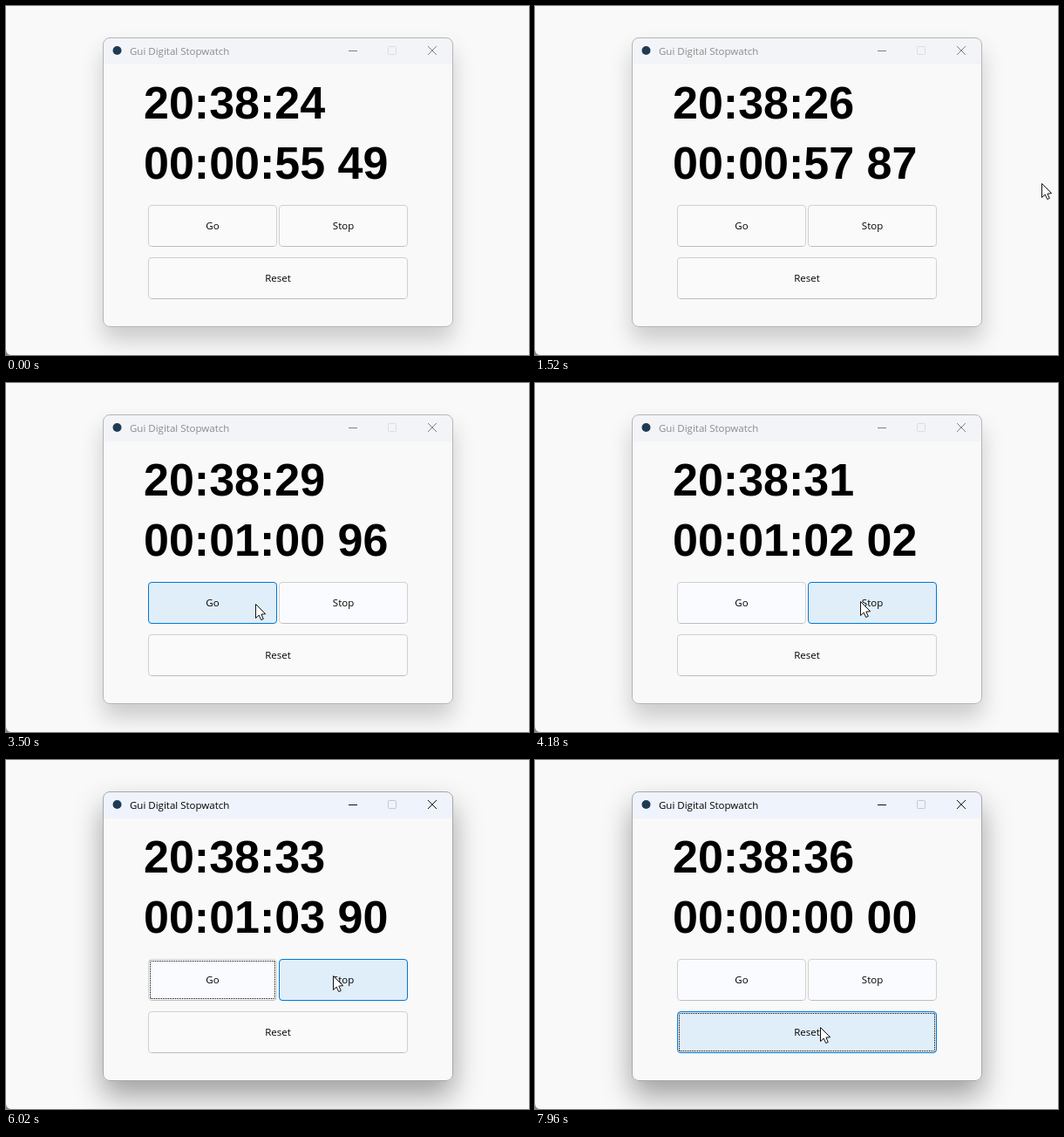
An HTML page with a canvas that plays this animation: 600 px wide and 400 px high, repeating every 8 s.

```html
<!DOCTYPE html>
<html lang="en">
<head>
<meta charset="utf-8">
<title>Gui Digital Stopwatch</title>
<style>
  html, body { margin: 0; width: 100%; height: 100%; overflow: hidden; background: #f9f9f9; }
  canvas { display: block; }
</style>
</head>
<body>
<canvas id="stage" width="600" height="400"></canvas>
<script>
const ctx = document.getElementById('stage').getContext('2d');
const LOOP = 8000, STEP = 20;
const SPEED = 1.5625;
const UI_FONT = '11.5px "Open Sans", "Noto Sans", sans-serif';
const DIGIT_FONT = 'bold 52px "Liberation Sans", Arial, sans-serif';

const buttons = {
  go: { label: 'Go', x: 163, y: 228, w: 148, h: 48, seen: 3340 },
  stop: { label: 'Stop', x: 313, y: 228, w: 148, h: 48, seen: 3100 },
  reset: { label: 'Reset', x: 163, y: 288, w: 298, h: 48, seen: LOOP }
};

const clicks = [
  { id: 'stop', down: 4460, up: 4540 },
  { id: 'go', down: 5080, up: 5180 },
  { id: 'stop', down: 6860, up: 6940 },
  { id: 'reset', down: 7880, up: 7960 }
];
const ACTIVE_FROM = clicks[0].down;

// time, x, y
const pointerPath = [
  [480, 601, 66], [820, 584, 193], [1100, 581, 203],
  [2700, 581, 203], [3480, 286, 253],
  [3900, 286, 253], [4260, 385, 250],
  [4640, 385, 250], [4880, 263, 248],
  [5240, 263, 248], [5640, 375, 247],
  [7500, 375, 247], [7740, 327, 306]
];

const pad = n => String(n).padStart(2, '0');

function pointerAt(t) {
  if (t <= pointerPath[0][0]) return null;
  const i = pointerPath.findIndex(p => p[0] >= t);
  if (i < 0) return pointerPath[pointerPath.length - 1].slice(1);
  const [t0, x0, y0] = pointerPath[i - 1], [t1, x1, y1] = pointerPath[i];
  const u = (t - t0) / (t1 - t0), s = u * u * (3 - 2 * u);
  return [Math.round(x0 + (x1 - x0) * s), Math.round(y0 + (y1 - y0) * s)];
}

function clockText(t) {
  return '20:38:' + (24 + Math.floor(0.5 + t * SPEED / 1000));
}

function counterText(t) {
  const [stop1, go, stop2, reset] = clicks.map(c => c.up);
  let cs = 0;
  if (t < reset) {
    const ran = Math.min(t, stop1) + Math.max(0, Math.min(t, stop2) - go);
    cs = Math.floor(5549.65 + ran * SPEED / 10);
  }
  const s = Math.floor(cs / 100);
  return `00:${pad(Math.floor(s / 60))}:${pad(s % 60)} ${pad(cs % 100)}`;
}

function text(str, x, y, font, color, align = 'left') {
  ctx.font = font;
  ctx.fillStyle = color;
  ctx.textAlign = align;
  ctx.fillText(str, x, y);
}

function line(color, ...pts) {
  ctx.strokeStyle = color;
  ctx.lineWidth = 1;
  ctx.beginPath();
  for (let i = 0; i < pts.length; i += 4) {
    ctx.moveTo(pts[i], pts[i + 1]);
    ctx.lineTo(pts[i + 2], pts[i + 3]);
  }
  ctx.stroke();
}

function roundRect(x, y, w, h, r) {
  ctx.beginPath();
  ctx.roundRect(x, y, w, h, r);
}

function drawBackdrop() {
  ctx.fillStyle = '#f9f9f9';
  ctx.fillRect(0, 0, 600, 400);
  ctx.fillStyle = '#8a8a8a';
  ctx.beginPath();
  ctx.moveTo(0, 394);
  ctx.quadraticCurveTo(0.5, 399, 5, 400);
  ctx.lineTo(0, 400);
  ctx.fill();
}

function drawWindow(active) {
  ctx.save();
  ctx.shadowColor = active ? 'rgba(0,0,0,.36)' : 'rgba(0,0,0,.19)';
  ctx.shadowBlur = active ? 33 : 26;
  ctx.shadowOffsetY = active ? 17 : 15;
  ctx.fillStyle = '#f9f9f9';
  roundRect(111, 36, 402, 332, 8);
  ctx.fill();
  ctx.restore();

  ctx.fillStyle = active ? '#eff3fb' : '#f3f4f7';
  roundRect(112, 37, 400, 30, [7, 7, 0, 0]);
  ctx.fill();
  ctx.strokeStyle = active ? '#a6a8aa' : '#b4b5b6';
  ctx.lineWidth = 1;
  roundRect(111.5, 36.5, 401, 331, 7.5);
  ctx.stroke();

  ctx.fillStyle = '#1f3b54';
  ctx.beginPath();
  ctx.arc(127.5, 51, 5, 0, Math.PI * 2);
  ctx.fill();

  text('Gui Digital Stopwatch', 142, 56, UI_FONT, active ? '#000' : '#8b8b8b');
  const ink = active ? '#111' : '#808080';
  line(ink, 393, 51.5, 403, 51.5);
  line(ink, 484, 46, 494, 56, 494, 46, 484, 56);
  ctx.strokeStyle = active ? '#c3c7ce' : '#dcdde0';
  roundRect(438.5, 46.5, 9, 9, 1);
  ctx.stroke();
}

function drawButton(b, state, focused, t) {
  const [fill, edge] = {
    idle: [t >= b.seen ? '#f9fbfe' : '#fafafa', '#d0d0d0'],
    hover: ['#e0eef9', '#0078d4'],
    pressed: ['#cce4f7', '#005499']
  }[state];
  ctx.fillStyle = fill;
  ctx.strokeStyle = edge;
  ctx.lineWidth = 1;
  roundRect(b.x + 0.5, b.y + 0.5, b.w - 1, b.h - 1, 3.5);
  ctx.fill();
  ctx.stroke();
  if (state === 'idle') line('#bdbdbd', b.x + 4, b.y + b.h - 0.5, b.x + b.w - 4, b.y + b.h - 0.5);
  if (focused) {
    ctx.save();
    ctx.setLineDash([1, 1]);
    ctx.lineDashOffset = 0.5; // keeps the dots on whole pixels
    ctx.strokeStyle = '#000';
    ctx.strokeRect(b.x + 2.5, b.y + 2.5, b.w - 5, b.h - 5);
    ctx.restore();
  }
  text(b.label, b.x + b.w / 2, b.y + 28, UI_FONT, '#000', 'center');
}

function drawPointer([x, y]) {
  ctx.save();
  ctx.translate(x + 0.5, y + 0.5);
  ctx.beginPath();
  ctx.moveTo(0, 0);
  ctx.lineTo(0, 16);
  ctx.lineTo(3.7, 12.6);
  ctx.lineTo(6.2, 18);
  ctx.lineTo(8.8, 16.9);
  ctx.lineTo(6.4, 11.6);
  ctx.lineTo(11.2, 11.2);
  ctx.closePath();
  ctx.fillStyle = '#fff';
  ctx.strokeStyle = '#111';
  ctx.lineWidth = 1;
  ctx.fill();
  ctx.stroke();
  ctx.restore();
}

function render(t) {
  const pointer = pointerAt(t);
  const pressed = clicks.find(c => t >= c.down && t < c.up);
  const last = clicks.filter(c => t >= c.down).pop();

  drawBackdrop();
  drawWindow(t >= ACTIVE_FROM);
  text(clockText(t), 158, 129, DIGIT_FONT, '#000');
  text(counterText(t), 158, 198, DIGIT_FONT, '#000');

  for (const [id, b] of Object.entries(buttons)) {
    const over = pointer && pointer[0] >= b.x && pointer[0] < b.x + b.w &&
      pointer[1] >= b.y && pointer[1] < b.y + b.h;
    const state = pressed && pressed.id === id ? 'pressed' : over ? 'hover' : 'idle';
    drawButton(b, state, Boolean(last) && last.id === id, t);
  }
  if (pointer) drawPointer(pointer);
}

function tick() {
  const t = performance.now() % LOOP;
  render(Math.floor(t / STEP) * STEP);
  requestAnimationFrame(tick);
}
tick();
</script>
</body>
</html>
```
